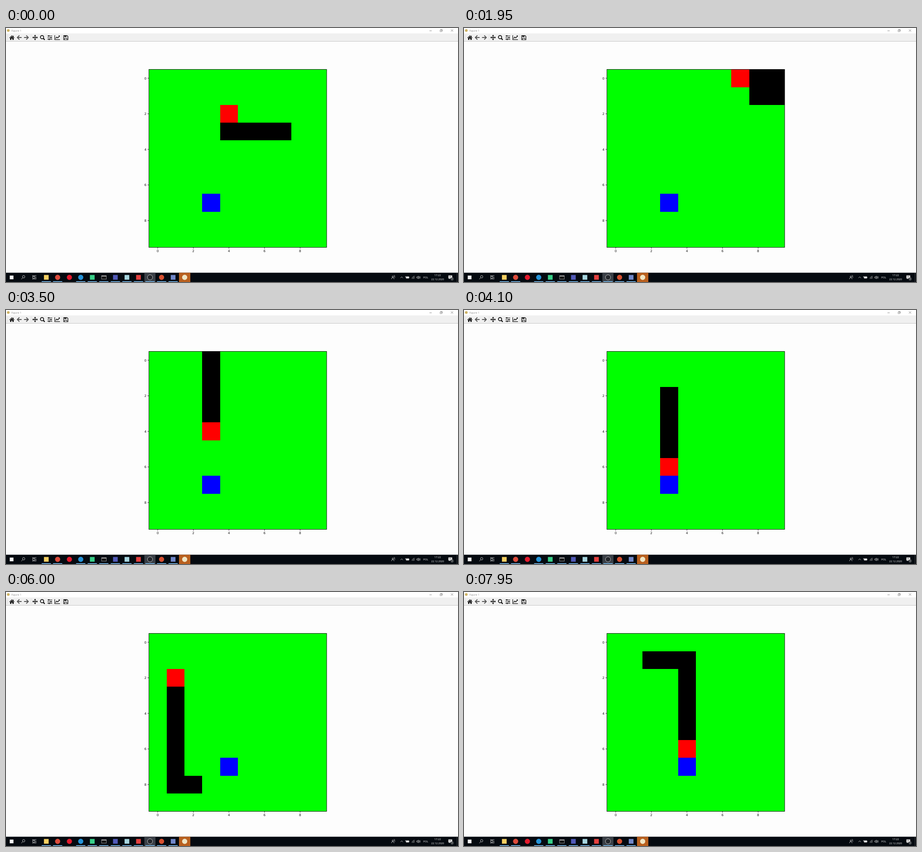
These frames come from a looping animation (998x561 px, 8000 ms). An HTML page:

```html
<!DOCTYPE html>
<html lang="en">
<head>
<meta charset="utf-8">
<title>Figure 1</title>
<style>
  html, body { margin: 0; width: 100%; height: 100%; overflow: hidden; background: #fdfdfd; }
  svg { display: block; width: 998px; height: 561px; }
  text { font-family: "Open Sans", sans-serif; }
  #ticks text { font: 7.1px "DejaVu Sans", sans-serif; fill: #111; }
  .line { fill: none; stroke: #111; }
  .tray { fill: none; stroke: #e8e8e8; stroke-width: .8; }
  .label { fill: #f2f2f2; font-size: 5.8px; }
  .crisp { shape-rendering: crispEdges; }
</style>
</head>
<body>
<svg viewBox="0 0 998 561">
  <rect width="998" height="561" fill="#fdfdfd"/>

  <!-- title bar -->
  <rect width="998" height="12" fill="#fff"/>
  <circle cx="5" cy="5.5" r="3" fill="#cdb264"/>
  <text x="12" y="8.3" font-size="5.9" fill="#8b8b8b">Figure 1</text>
  <path d="M935 6.2h5M958.5 4.5h3.6v3.6h-3.6zM959.7 4.5v-1.2h3.6v3.6h-1.2M982.3 3l5 5m0-5l-5 5" fill="none" stroke="#777" stroke-width=".8"/>

  <!-- toolbar -->
  <rect y="12" width="998" height="17" fill="#f0f0f0"/>
  <path class="crisp" d="M0 29.5h998" stroke="#c6c6c6"/>
  <path d="M3.5 14v13M55.5 14v13M123.5 14v13" stroke="#dcdcdc" stroke-width=".8"/>
  <path d="M7.3 21.6L13 16.3l2.3 2.1v-1.5h1.5v2.9l1.9 1.8-.8.8L13 18l-4.9 4.4zM9 22.4l4-3.6 4 3.6v3.9h-2.9v-3h-2.2v3H9z" fill="#111"/>
  <g class="line" stroke-width="1.9">
    <path id="arrow" d="M34.5 21H25.5M29.6 16.4L25 21l4.6 4.6" style="stroke:#555"/>
    <use href="#arrow" transform="matrix(-1 0 0 1 74.3 0)"/>
  </g>
  <path class="line" d="M59.5 21h9.4M64.2 16.3v9.4" stroke-width="1.5"/>
  <path d="M58.2 21l2.6-2.4v4.8zM70.2 21l-2.6-2.4v4.8zM64.2 15l-2.4 2.6h4.8zM64.2 27l-2.4-2.6h4.8z" fill="#111"/>
  <circle class="line" cx="79.6" cy="20.2" r="3.6" stroke-width="1.7"/>
  <path class="line" d="M82.3 22.9l3.2 3.2" stroke-width="2.2"/>
  <path class="line" d="M91.5 17.5h10.5M91.5 21.2h10.5M91.5 24.9h10.5" stroke-width="1.1"/>
  <path class="line" d="M94.5 16v3M99.3 19.7v3M95.3 23.4v3" stroke-width="2"/>
  <path class="line" d="M107.6 16v9.7h11.6" stroke-width="1.2"/>
  <path class="line" d="M109.4 23.2l2.7-3.2 2.2 2 3.5-4" stroke-width="1.5"/>
  <path d="M115.6 16.6h3.2v3.2z" fill="#111"/>
  <path class="line" d="M127.4 16.6h7.3l2 2v7.2h-9.3z" stroke-width="1.3"/>
  <path d="M129 17h5v3h-5zM129 22h6v3.6h-6z" fill="#111"/>
  <path d="M132.1 17.4h1.1v2h-1.1zM130.1 23h3.8v2.6h-3.8z" fill="#f0f0f0"/>

  <!-- plot -->
  <rect x="315.5" y="91.5" width="392.5" height="393" fill="#0f0"/>
  <g id="cells" class="crisp"></g>
  <rect x="315.5" y="91.5" width="392.5" height="393" fill="none" stroke="#000" stroke-width=".9"/>
  <g id="ticks"></g>

  <!-- taskbar -->
  <rect y="540.5" width="998" height="20.5" fill="#050a10"/>
  <rect x="305.5" y="540.5" width="24.5" height="20.5" fill="#3a3f46"/>
  <rect x="382" y="540.5" width="25" height="20.5" fill="#b9601f"/>
  <g id="apps"></g>
  <rect x="8.3" y="546.8" width="8.2" height="8.2" fill="#f4f4f4"/>
  <g class="tray">
    <circle cx="39" cy="549.4" r="2.7"/>
    <path d="M37 551.4l-3.2 3.5"/>
    <path d="M59 548.7h4.6v4H59zM58.5 546.4v1h5.6v-1M58.5 555.2v-1h5.6v1M66 546v2M66 549.5v5.8" />
    <rect x="211" y="547" width="10.5" height="7.8" fill="#111" stroke="#aaa"/>
    <path d="M211 548h10.5" stroke="#ccc" stroke-width="1.4"/>
    <circle cx="854" cy="549.3" r="1.5"/>
    <path d="M851.2 554.6c0-4.5 5.6-4.5 5.6 0M856.2 546.4c2.6-.6 2.9 3.1.6 3.1 1.3 0 2 .9 2.1 2"/>
    <path d="M871 552.2l2.7-2.7 2.7 2.7"/>
    <path d="M883.5 549h6v3.8h-6zM890 550v2M882.2 548v3"/>
    <path d="M896.5 553.8a6 6 0 0 1 5.7-5.7M898.5 553.8a4 4 0 0 1 3.7-3.7M900.4 553.8a2 2 0 0 1 1.8-1.8" stroke="#bbb"/>
    <path d="M907 549.7h1.5l2-1.8v6l-2-1.8H907zM912 549.3q1.2 1.6 0 3.2M913.4 548q2.2 2.9 0 5.8"/>
    <path d="M995.5 541v20" stroke="#555" stroke-width=".6"/>
  </g>
  <path d="M884 549.5h5v3h-5zM976.8 546.5h8.4v6.5h-4.8l-2 2v-2h-1.6z" fill="#f2f2f2"/>
  <path d="M978.3 548.5h5.4M978.3 550.5h4" stroke="#333" stroke-width=".6"/>
  <circle cx="985" cy="554.2" r="3.1" fill="#252a2f" stroke="#aaa" stroke-width=".5"/>
  <g class="label" text-anchor="middle">
    <text x="926.7" y="552.8">POL</text>
    <text x="953" y="547.9">17:22</text>
    <text x="953" y="557.2" style="font-size:5.6px">22.12.2020</text>
    <text x="985" y="556" style="font-size:5px">3</text>
  </g>
</svg>
<script>
const CELL = 39.29, LEFT = 315.4, TOP = 91.3;
const LOOP = 8000, FRAME = 50, STEP = 210.5, PHASE = .51, HEAD_START = 4;

function add(parent, tag, attrs, text) {
  const node = document.createElementNS("http://www.w3.org/2000/svg", tag);
  for (const key in attrs) node.setAttribute(key, attrs[key]);
  if (text !== undefined) node.textContent = text;
  parent.append(node);
  return node;
}

const ticks = document.getElementById("ticks");
for (let n = 0; n < 10; n += 2) {
  const x = LEFT + (n + .5) * CELL, y = TOP + (n + .5) * CELL;
  add(ticks, "path", { d: `M${x} 484.5v3M315.5 ${y}h-3`, stroke: "#000", "stroke-width": .8 });
  add(ticks, "text", { x, y: 494.9, "text-anchor": "middle" }, n);
  add(ticks, "text", { x: 310, y: y + 2.6, "text-anchor": "end" }, n);
}

// x, shape, colour, underlined
const apps = document.getElementById("apps");
[
  [89, "square", "#f6cf62", 1], [114, "circle", "#dc4b3b", 1], [140, "circle", "#e3192c", 0],
  [165, "circle", "#2493d8", 1], [190.5, "square", "#38cf88", 1], [216, "", "", 1],
  [241.5, "square", "#5159b8", 1], [267, "square", "#a7d5df", 1], [292.5, "square", "#e5403f", 1],
  [318, "circle", "#24272c", 1], [343.5, "circle", "#d65030", 1], [369, "square", "#7187c9", 1],
  [394.5, "circle", "#efe5c4", 0]
].forEach(([x, shape, fill, open]) => {
  if (shape === "circle") {
    const ring = x === 318 ? { stroke: "#ccc", "stroke-width": .9 } : {};
    add(apps, "circle", { cx: x, cy: 550.7, r: 5.7, fill, ...ring });
  } else if (shape) {
    add(apps, "rect", { x: x - 5.2, y: 545.5, width: 10.4, height: 10.4, fill });
  }
  if (open) add(apps, "rect", { x: x - 10.2, y: 559.4, width: 20.4, height: 1.6, fill: "#76b9ed" });
});

// The snake's route, expanded from its corners to single cells.
const corners = [[7, 3], [4, 3], [4, 1], [9, 1], [9, 0], [3, 0], [3, 8], [1, 8], [1, 1], [4, 1], [4, 6]];
const route = [corners[0]];
for (const [cx, cy] of corners.slice(1)) {
  let [x, y] = route.at(-1);
  while (x !== cx || y !== cy) {
    x += Math.sign(cx - x);
    y += Math.sign(cy - y);
    route.push([x, y]);
  }
}

const stages = [
  { from: 0, length: 5, food: [3, 7] },
  { from: 20, length: 6, food: [1, 7] },
  { from: 24, length: 7, food: [1, 6] },
  { from: 25, length: 8, food: [4, 7] }
];

const cells = document.getElementById("cells");
function square([x, y], fill) {
  add(cells, "rect", { x: LEFT + x * CELL, y: TOP + y * CELL, width: CELL, height: CELL, fill });
}

let shown = -1;
function draw(time) {
  const t = Math.floor((time % LOOP + 3) / FRAME) * FRAME % LOOP;
  const move = Math.floor(t / STEP + PHASE);
  if (move === shown) return;
  shown = move;
  const { length, food } = stages.findLast(s => s.from <= move);
  const head = move + HEAD_START;
  cells.replaceChildren();
  square(food, "#00f");
  for (const cell of route.slice(head - length + 1, head)) square(cell, "#000");
  square(route[head], "#f00");
}

const start = performance.now();
function tick() {
  draw(performance.now() - start);
  requestAnimationFrame(tick);
}
tick();
</script>
</body>
</html>
```
